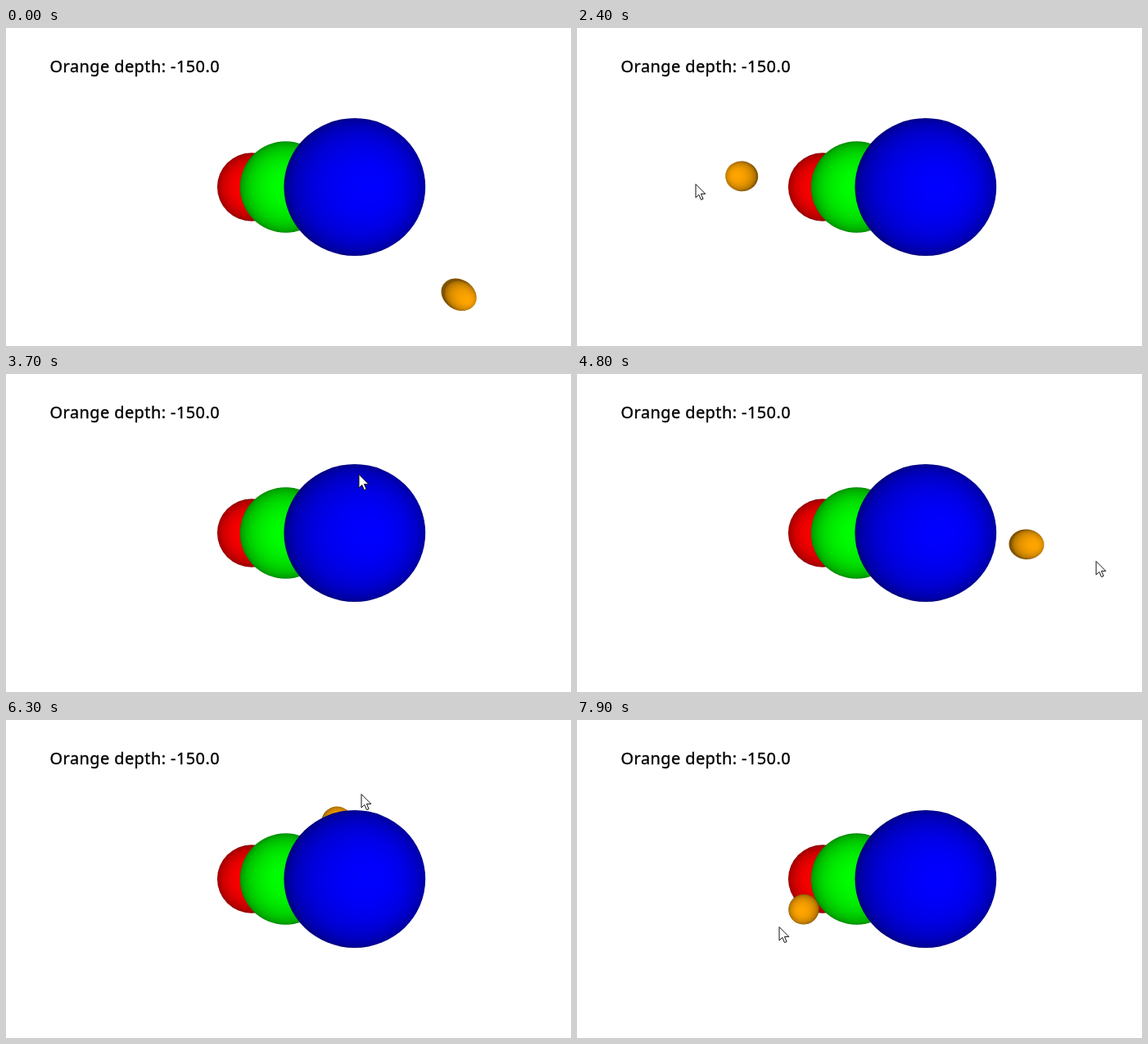
Write an HTML page with a canvas that moves like this. It is 690 by 388 pixels and loops after 8000 ms.

```html
<!DOCTYPE html>
<html>
<head>
<meta charset="utf-8">
<style>
html, body { margin: 0; width: 100%; height: 100%; overflow: hidden; background: #fff; }
canvas { display: block; }
</style>
</head>
<body>
<canvas id="stage" width="690" height="388"></canvas>
<script>
const ctx = document.getElementById('stage').getContext('2d');
const LOOP = 8000, STEP = 100;
const CX = 345, CY = 194;
const FOCAL = CY / Math.tan(Math.PI / 6);
const ORANGE_DEPTH = -150;
const PARKED = [646, 384];

// Turning points of the pointer: time, x, y
const path = [
  [1100, 14, 186], [1500, 127.5, 176.6], [1600, 124, 178], [2100, 185, 134],
  [2300, 137, 175], [2400, 145, 190], [2800, 260, 276], [3700, 431, 122],
  [4000, 500, 48], [4500, 640, 150], [4700, 640, 214], [4800, 634, 228],
  [5400, 320, 294], [5700, 305, 215], [6200, 430, 93], [6300, 434, 90],
  [6900, 195, 185], [7300, 222, 150], [7800, 246.6, 247.5], [7900, 247, 252]
];

function slope(i, axis) {
  const a = path[Math.max(i - 1, 0)], b = path[Math.min(i + 1, path.length - 1)];
  return (b[axis] - a[axis]) / (b[0] - a[0]);
}

// Smooth (Hermite) pointer position at a given time
function pointerAt(time) {
  if (time < path[0][0]) return PARKED;
  const next = path.findIndex(p => p[0] > time);
  if (next < 0) return path[path.length - 1].slice(1);
  const i = next - 1, a = path[i], b = path[next];
  const span = b[0] - a[0], u = (time - a[0]) / span, v = 1 - u;
  return [1, 2].map(k =>
    v * v * (1 + 2 * u) * a[k] + u * u * (3 - 2 * u) * b[k] +
    span * u * v * (v * slope(i, k) - u * slope(next, k)));
}

// Gradient on a unit disc for a sphere lit from the front and seen at an angle:
// the outer rim stays lit, the inner rim falls into ambient light
function shading(angle, rgb) {
  const sin = Math.sin(angle), cos = Math.cos(angle);
  const near = -cos, far = sin + (1 - sin) / cos;
  const light = ctx.createRadialGradient(sin, 0, 0, (near + far) / 2, 0, (far - near) / 2);
  for (let i = 0; i <= 10; i++) {
    const a = i * Math.PI / 20, shade = 0.5 + 0.5 * Math.cos(a);
    light.addColorStop(Math.sin(a), `rgb(${rgb.map(c => Math.round(c * shade))})`);
  }
  return light;
}

// A sphere in perspective, stretched away from the view centre
function sphere(x, y, radius, rgb) {
  const dx = x - CX, dy = y - CY, tilt = Math.hypot(dx, dy) / FOCAL;
  ctx.save();
  ctx.translate(x, y);
  ctx.rotate(Math.atan2(dy, dx));
  ctx.scale(radius * Math.hypot(1, tilt), radius);
  ctx.fillStyle = shading(Math.atan(tilt), rgb);
  ctx.beginPath();
  ctx.arc(0, 0, 1, 0, 2 * Math.PI);
  ctx.fill();
  ctx.restore();
}

const arrow = new Path2D('M0 .5V17L3.8 13.4L6.5 19.6L9.1 18.5L6.4 12.4H11.8Z');

function drawPointer([x, y]) {
  ctx.save();
  ctx.translate(x, y);
  ctx.fillStyle = '#fff';
  ctx.strokeStyle = '#111';
  ctx.lineWidth = 1;
  ctx.fill(arrow);
  ctx.stroke(arrow);
  ctx.restore();
}

function drawLabel(text, x, y) {
  ctx.fillStyle = ctx.strokeStyle = '#000';
  ctx.font = '20px "Noto Sans", "Open Sans", sans-serif';
  ctx.letterSpacing = '0.4px';
  ctx.lineWidth = 0.35;
  ctx.fillText(text, x, y);
  ctx.strokeText(text, x, y);
}

function draw(time) {
  ctx.fillStyle = '#fff';
  ctx.fillRect(0, 0, 690, 388);
  drawLabel(`Orange depth: ${ORANGE_DEPTH.toFixed(1)}`, 53.6, 54);

  // The orange sphere trails the pointer by one step
  const [px, py] = pointerAt(time - STEP);
  const scale = FOCAL / (FOCAL - ORANGE_DEPTH);
  sphere(300, CY, 41.7, [255, 0, 0]);
  sphere(CX + (px - CX) * scale, CY + (py - CY) * scale, 18.4, [255, 165, 0]);
  sphere(341.5, CY, 55.8, [0, 255, 0]);
  sphere(425.8, CY, 84, [0, 0, 255]);

  if (time >= path[0][0]) drawPointer(pointerAt(time));
}

function tick() {
  const time = performance.now() % LOOP;
  draw(Math.floor(time / STEP) * STEP);
  requestAnimationFrame(tick);
}
tick();
</script>
</body>
</html>
```
